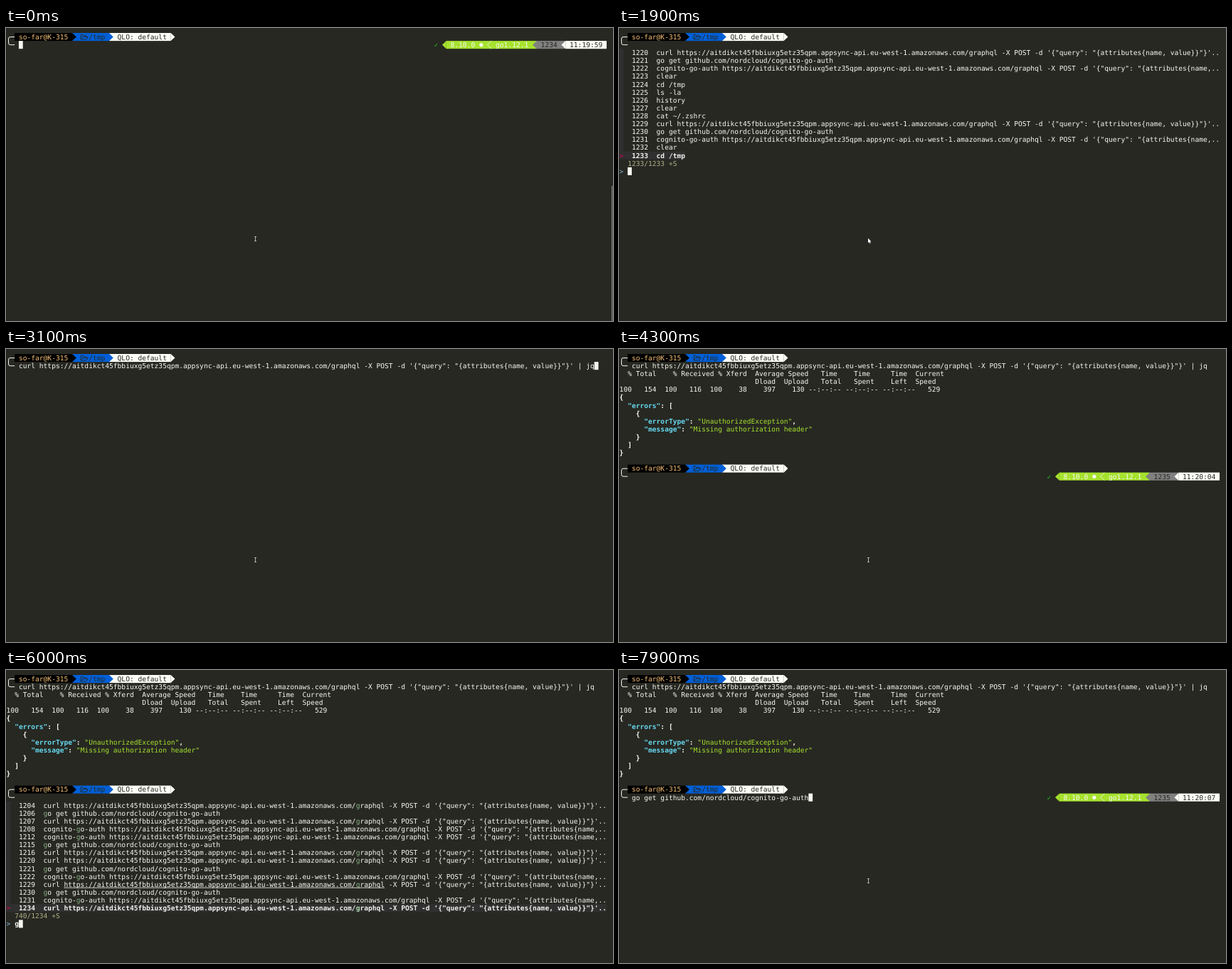
Animation, 853 px wide and 412 px high, one loop 8000 ms. Source, as an HTML page with a canvas:

```html
<!DOCTYPE html>
<html lang="en">
<head>
<meta charset="utf-8">
<title>Terminal history search</title>
<style>
html, body { margin: 0; width: 100%; height: 100%; overflow: hidden; background: #272822; }
canvas { display: block; }
</style>
</head>
<body>
<canvas id="stage" width="853" height="412"></canvas>
<script>
const ctx = document.getElementById('stage').getContext('2d');
const LOOP = 8000, STEP = 100;
const CELL = 5.777, LINE = 11.11, LEFT = 0.6, TOP = 7, BASE = 8.9;
const FONT = '9.6px "DejaVu Sans Mono", monospace';
const C = {
  bg: '#272822', fg: '#f8f8f2', black: '#000', tan: '#f4bf75', blue: '#005fd7',
  white: '#fdfdf8', lime: '#a6e22e', gray: '#808080', cyan: '#66d9ef', ok: '#22c522',
  bar: '#303030', current: '#f0f0ec', hit: '#87af87', hitCurrent: '#afd7af',
  pointer: '#d7005f', info: '#afaf87', prompt: '#87afd7'
};

const url = 'https://aitdikct45fbbiuxg5etz35qpm.appsync-api.eu-west-1.amazonaws.com/graphql';
const args = ` -X POST -d '{"query": "{attributes{name, value}}"}'`;
const post = 'curl ' + url + args;
const postJq = post + ' | jq';
const auth = 'cognito-go-auth ' + url + args;
const get = 'go get github.com/nordcloud/cognito-go-auth';
const hook = 'curl https://hooks.slack.com/services/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';

const history = {
  67: hook, 68: hook + ' -v',
  908: 'go test ./...', 1088: 'go test ./...', 1110: 'go test ./...',
  976: 'go get bitbucket.org/nordcloud/cognito-authorizer/pkg/request/auth',
  1036: 'git commit -m "Patch customer attributes"',
  1039: 'git commit -m "customers list api fix"',
  1086: 'git commit -m "Query to list customers and accounts availale for the user"',
  1091: 'git commit -m "Removed roles from the available customers query"',
  1094: 'git commit -m "Find not loaded customers"',
  1097: 'git commit -m "Added option to return customer without accounts"',
  1121: 'go get github.com:nordcloud/cognito-go-auth.git',
  1185: 'go test -coverprofile fmt',
  1203: post, 1223: 'clear', 1224: 'cd /tmp', 1225: 'ls -la', 1226: 'history',
  1227: 'clear', 1228: 'cat ~/.zshrc', 1232: 'clear', 1233: 'cd /tmp'
};
for (const id of [1122, 1123, 1182, 1187, 1206, 1215, 1221, 1230]) history[id] = get;
for (const id of [1208, 1212, 1222, 1231]) history[id] = auth;
for (const id of [1204, 1207, 1216, 1220, 1229, 1234]) history[id] = postJq;

const latest = last => Array.from({ length: 14 }, (_, i) => last - 13 + i);
const withC = [1208, 1212, 1215, 1216, 1220, 1221, 1222, 1223, 1224, 1228, 1229, 1231, 1232, 1233];
const withCur = [1036, 1039, 1086, 1091, 1094, 1097, 67, 68, 1203, 1204, 1207, 1216, 1220, 1229];
const withG = [1204, 1206, 1207, 1208, 1212, 1215, 1216, 1220, 1221, 1222, 1229, 1230, 1231, 1234];
const withGo = [908, 1088, 1110, 1185, 976, 1121, 1122, 1123, 1182, 1187, 1206, 1215, 1221, 1230];

// Search stages: start time, query, match count, visible entries
const searches = [
  { row: 0, end: 2900, total: 1233, stages: [
    [1500, '', 1233, latest(1233)], [2200, 'c', 826, withC], [2300, 'cu', 431, withCur],
    [2400, 'cur', 272, withCur], [2500, 'curl', 118, withCur]] },
  { row: 14, end: 7100, total: 1234, stages: [
    [5300, '', 1234, latest(1234)], [5900, 'g', 740, withG], [6100, 'go', 468, withGo],
    [6200, 'go ', 468, withGo], [6300, 'go g', 440, withGo], [6400, 'go ge', 411, withGo],
    [6500, 'go get', 386, withGo]] }
];

const colX = col => LEFT + col * CELL;
const rowY = row => TOP + row * LINE;

function fillCells(col, row, count, color) {
  ctx.fillStyle = color;
  ctx.fillRect(colX(col), rowY(row), count * CELL, LINE);
}

function print(col, row, text, color = C.fg, bold = false, colorAt = null) {
  ctx.font = (bold ? 'bold ' : '') + FONT;
  [...text].forEach((ch, i) => {
    if (ch === ' ') return;
    ctx.fillStyle = colorAt ? colorAt(i) : color;
    ctx.fillText(ch, colX(col + i), rowY(row) + BASE);
  });
}

function path(points, close) {
  ctx.beginPath();
  points.forEach(([x, y]) => ctx.lineTo(x, y));
  if (close) ctx.closePath();
}

function arrow(col, row, dir, color, outline = false) {
  const x = colX(dir > 0 ? col : col + 1), y = rowY(row);
  path([[x, y], [x + dir * CELL, y + LINE / 2], [x, y + LINE]], !outline);
  if (outline) {
    ctx.strokeStyle = color;
    ctx.lineWidth = 0.8;
    ctx.stroke();
  } else {
    ctx.fillStyle = color;
    ctx.fill();
  }
}

function folder(x, y) {
  ctx.strokeStyle = C.bg;
  ctx.lineWidth = 0.9;
  path([[x + 8.5, y + 3], [x + 8.5, y + 1.5], [x + 4.2, y + 1.5], [x + 3.4, y], [x + 0.5, y],
    [x + 0.5, y + 6.5], [x + 8.3, y + 6.5], [x + 10.6, y + 3], [x + 3, y + 3], [x + 0.7, y + 6.3]]);
  ctx.stroke();
}

function leftPrompt(row) {
  const x = colX(0.5), y = rowY(row + 0.5), end = colX(2), r = 2.6;
  ctx.strokeStyle = C.fg;
  ctx.lineWidth = 1;
  ctx.beginPath();
  ctx.moveTo(end, y);
  ctx.arcTo(x, y, x, y + r, r);
  ctx.arcTo(x, y + LINE, x + r, y + LINE, r);
  ctx.lineTo(end, y + LINE);
  ctx.stroke();

  fillCells(2, row, 14, C.black);
  fillCells(16, row, 9, C.blue);
  fillCells(25, row, 15, C.white);
  arrow(16, row, 1, C.black);
  arrow(25, row, 1, C.blue);
  arrow(40, row, 1, C.white);
  print(3, row, 'so-far@K-315', C.tan);
  folder(colX(18), rowY(row) + 2.4);
  print(20, row, '/tmp', C.bg);
  print(27, row, 'QLO: default', C.bg);
}

function rightPrompt(row, number, clock) {
  print(104, row, '✓', C.ok);
  fillCells(107, row, 22, C.lime);
  fillCells(129, row, 7, C.gray);
  fillCells(136, row, 10, C.white);
  arrow(106, row, -1, C.lime);
  arrow(117, row, -1, C.fg, true);
  arrow(128, row, -1, C.gray);
  arrow(135, row, -1, C.white);
  print(108, row, '8.10.0', C.fg);
  ctx.fillStyle = C.fg;
  ctx.beginPath();
  ctx.arc(colX(115.5), rowY(row) + 5.7, 2.6, 0, Math.PI * 2);
  ctx.fill();
  print(119, row, 'go1.12.1', C.fg);
  print(130, row, String(number), C.bg);
  print(137, row, clock, C.bg);
}

function cursor(col, row) {
  fillCells(col, row, 1, C.fg);
}

// Shortest subsequence match of each term, preferring word starts
function matches(text, query) {
  const found = new Set();
  for (const term of query.split(' ').filter(Boolean)) {
    let best = null, bestCost = Infinity;
    for (let start = 0; start < text.length; start++) {
      if (text[start].toLowerCase() !== term[0]) continue;
      const hits = [start];
      for (const ch of term.slice(1)) {
        const next = text.toLowerCase().indexOf(ch, hits[hits.length - 1] + 1);
        if (next < 0) break;
        hits.push(next);
      }
      if (hits.length < term.length) continue;
      const inside = start > 0 && /\w/.test(text[start - 1]);
      const cost = hits[hits.length - 1] - start + (inside ? 0.5 : 0);
      if (cost < bestCost) { best = hits; bestCost = cost; }
    }
    if (best) best.forEach(i => found.add(i));
  }
  return found;
}

function searchList(search, stage) {
  const [, query, count, ids] = stage;
  const first = search.row + 2;
  ids.forEach((id, i) => {
    const row = first + i, current = i === ids.length - 1;
    const full = history[id];
    const text = full.length > 137 ? full.slice(0, 135) + '..' : full;
    const hits = matches(text, query);
    const color = current ? C.current : C.fg;
    fillCells(0, row, current ? 9 + text.length : 1, C.bar);
    if (current) print(0, row, '>', C.pointer);
    print(2, row, String(id).padStart(5) + (id === 1185 ? '*' : ''), color, current);
    print(9, row, text, color, current,
      k => hits.has(k) ? (current ? C.hitCurrent : C.hit) : color);
    const link = text.indexOf(url);
    if (row === 26 && link >= 0) {
      ctx.fillStyle = C.fg;
      ctx.fillRect(colX(9 + link), rowY(row) + BASE + 1, url.length * CELL, 0.8);
    }
  });
  print(2, first + 14, `${count}/${search.total} +S`, C.info);
  print(0, first + 15, '>', C.prompt);
  print(2, first + 15, query, C.fg, true);
  cursor(2 + query.length, first + 15);
}

function transfer(done) {
  print(0, 2, '  % Total    % Received % Xferd  Average Speed   Time    Time     Time  Current');
  print(33, 3, 'Dload  Upload   Total   Spent    Left  Speed');
  const blank = ' --:--:-- --:--:-- --:--:--';
  print(0, 4, done
    ? '100   154  100   116  100    38    397    130' + blank + '   529'
    : '  0     0    0     0    0     0      0      0' + blank + '     0');
}

function response() {
  [[0, 5, '{'], [4, 7, '{'], [4, 10, '}'], [2, 11, ']'], [0, 12, '}'],
    [10, 6, ': ['], [17, 8, ':'], [15, 9, ':']].forEach(p => print(...p, C.fg, true));
  [[2, 6, '"errors"'], [6, 8, '"errorType"'], [6, 9, '"message"']]
    .forEach(p => print(...p, C.cyan, true));
  print(19, 8, '"UnauthorizedException"', C.lime);
  print(42, 8, ',', C.fg, true);
  print(17, 9, '"Missing authorization header"', C.lime);
}

function mouse(isArrow) {
  if (isArrow) {
    path([[350, 295.5], [350, 302.3], [351.6, 301], [352.6, 303.2], [353.6, 302.7],
      [352.7, 300.6], [354.6, 300.4]], true);
    ctx.lineWidth = 0.8;
    ctx.strokeStyle = '#111';
    ctx.stroke();
    ctx.fillStyle = '#fff';
    ctx.fill();
  } else {
    ctx.fillStyle = '#c4c4be';
    ctx.fillRect(350, 293.5, 0.9, 6);
    ctx.fillRect(349, 293, 3, 0.9);
    ctx.fillRect(349, 299, 3, 0.9);
  }
}

function draw(t) {
  ctx.fillStyle = C.bg;
  ctx.fillRect(0, 0, 853, 412);
  ctx.fillStyle = '#1e1f1a';
  ctx.fillRect(0, 0, 1, 412);

  const search = searches.find(s => t >= s.stages[0][0] && t < s.end);
  const between = (a, b) => t >= a && t < b;

  leftPrompt(0);
  if (t < 1500) {
    rightPrompt(1, 1234, '11:19:59');
    if (!between(500, 1100)) cursor(3, 1);
  }
  if (t >= 2900) print(3, 1, postJq);
  if (between(2900, 3300)) cursor(143, 1);
  if (t >= 3400) transfer(t >= 3700);
  if (between(3300, 3700)) cursor(0, t < 3400 ? 2 : 5);
  if (t >= 3700) {
    response();
    leftPrompt(14);
    if (!search) rightPrompt(15, 1235, t < 7100 ? '11:20:04' : '11:20:07');
    if (between(3700, 4100) || between(4700, 5300)) cursor(3, 15);
  }
  if (t >= 7100) {
    print(3, 15, get);
    if (!between(7300, 7900)) cursor(3 + get.length, 15);
  }
  if (search) searchList(search, search.stages.filter(s => s[0] <= t).pop());

  const fade = Math.min(1, Math.max(0, (1100 - t) / 400));
  if (fade) {
    ctx.globalAlpha = fade;
    ctx.fillStyle = '#8b8b86';
    ctx.fillRect(851, 222, 1.3, 190);
    ctx.globalAlpha = 1;
  }
  mouse(between(1300, 2900));
}

ctx.textRendering = 'geometricPrecision';
let shown = -1;
function frame() {
  const t = Math.floor(performance.now() % LOOP / STEP) * STEP;
  if (t !== shown) draw(shown = t);
  requestAnimationFrame(frame);
}
frame();
</script>
</body>
</html>
```
